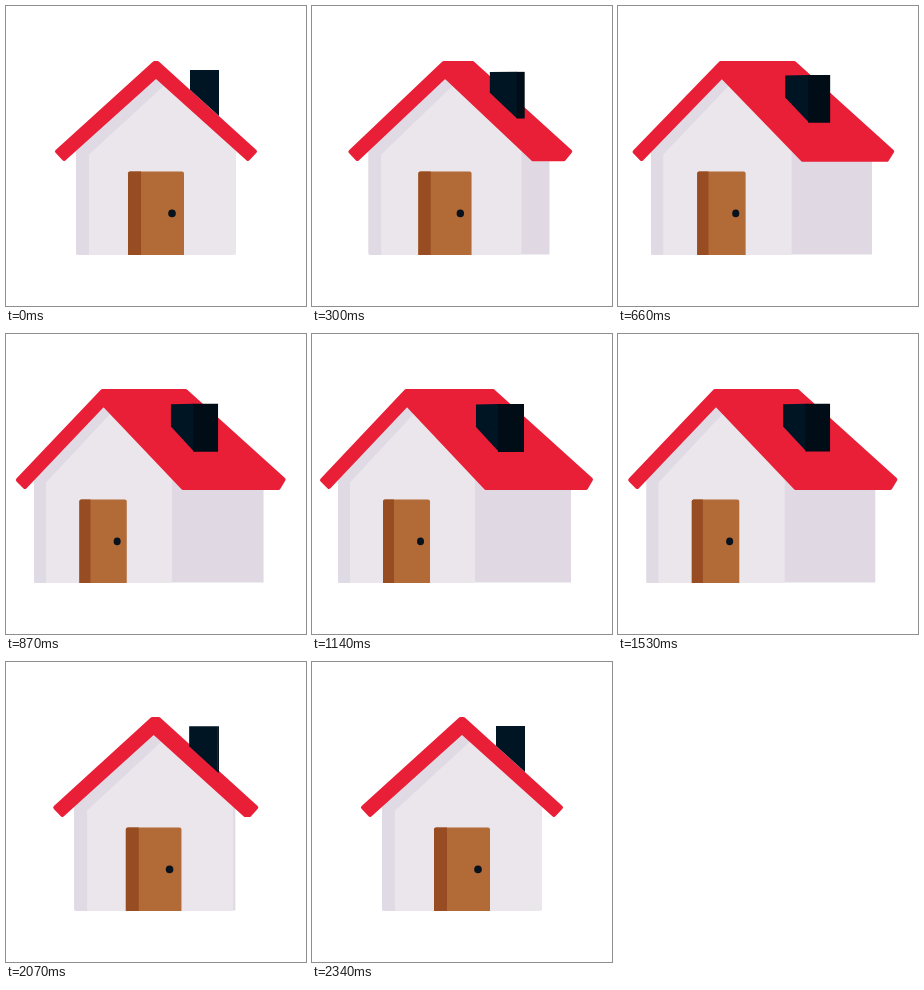
Animation of 300 by 300 pixels, one loop 4.37 s. Source, as an HTML page:

```html
<!DOCTYPE html>
<html lang="en">
<head>
<meta charset="utf-8">
<title>Turning house</title>
<style>
  html, body { margin: 0; width: 100%; height: 100%; overflow: hidden; background: #fff; }
  svg { display: block; width: 100%; height: 100%; }

  /* Every part morphs from its front view (--a) to its turned view (--b) and back. */
  path { d: var(--a); animation: turn 4370ms infinite; }

  @keyframes turn {
    0% { d: var(--a); animation-timing-function: cubic-bezier(.33, 0, .24, 1); }
    26.773% { d: var(--b); animation-timing-function: cubic-bezier(.94, 0, .21, 1); }
    53.547%, 100% { d: var(--a); }
  }

  .side {
    fill: #e0d9e4;
    --a: path("M190 142 L228 142 L228 248.5 L190 248.5 Z");
    --b: path("M150 142 L259 142 L259 248.5 L150 248.5 Z");
  }
  .front {
    fill: #eae6ec;
    --a: path("M72 249 Q70 249 70 247 L70 140 L150 68 L230 140 L230 247 Q230 249 228 249 Z");
    --b: path("M27 249 Q26 249 26 248 L26 140 L95 66 L163 140 L163 249 Q163 249 163 249 Z");
  }
  .shade {
    fill: #e0dae5;
    --a: path("M72 249 Q70 249 70 247 L70 140 L150 68 L157.5 80 L83 148.5 L83 249 Z");
    --b: path("M27 249 Q26 249 26 248 L26 140 L95 66 L101.5 80 L38 148.5 L38 249 Z");
  }
  .door {
    fill: #b26a36;
    --a: path("M122 249 L122 167.5 Q122 165.5 124 165.5 L176 165.5 Q178 165.5 178 167.5 L178 249 Z");
    --b: path("M71 249 L71 167.5 Q71 165.5 73 165.5 L116 165.5 Q118 165.5 118 167.5 L118 249 Z");
  }
  .jamb {
    fill: #984c22;
    --a: path("M122 249 L122 167.5 Q122 165.5 124 165.5 L135 165.5 L135 249 Z");
    --b: path("M71 249 L71 167.5 Q71 165.5 73 165.5 L82 165.5 L82 249 Z");
  }
  .knob {
    fill: #07121d;
    --a: path("M162.2 207.4 A3.8 3.8 0 0 1 169.8 207.4 A3.8 3.8 0 0 1 162.2 207.4 Z");
    --b: path("M105 207.4 A3.5 3.8 0 0 1 112 207.4 A3.5 3.8 0 0 1 105 207.4 Z");
  }
  .roof {
    fill: #e91e37;
    stroke: #e91e37;
    stroke-width: 4;
    stroke-linejoin: round;
    --a: path("M51 145.5 L148.5 57 L151.5 57 L249 145.5 L242 153 L242 153 L150 70.3 L58 153 Z");
    --b: path("M10 146 L94 57 L181 57 L279 145.5 L274 154 L173.8 154 L95 70.3 L17 153 Z");
  }
  .stack {
    fill: #001524;
    --a: path("M184 64 L213 64 L213 110.1 L184 83.8 Z");
    --b: path("M164 70.5 L187 70 L187 118 L164 93 Z");
  }
  .flank {
    fill: #000c16;
    --a: path("M213 64 L213 64 L213 110.1 L213 110.1 Z");
    --b: path("M186 70 L212 70 L212 118 L186 118 Z");
  }
</style>
</head>
<body>
<svg viewBox="0 0 300 300" aria-label="House">
  <path class="side"/>
  <path class="front"/>
  <path class="shade"/>
  <path class="door"/>
  <path class="jamb"/>
  <path class="knob"/>
  <path class="roof"/>
  <path class="stack"/>
  <path class="flank"/>
</svg>
</body>
</html>
```
